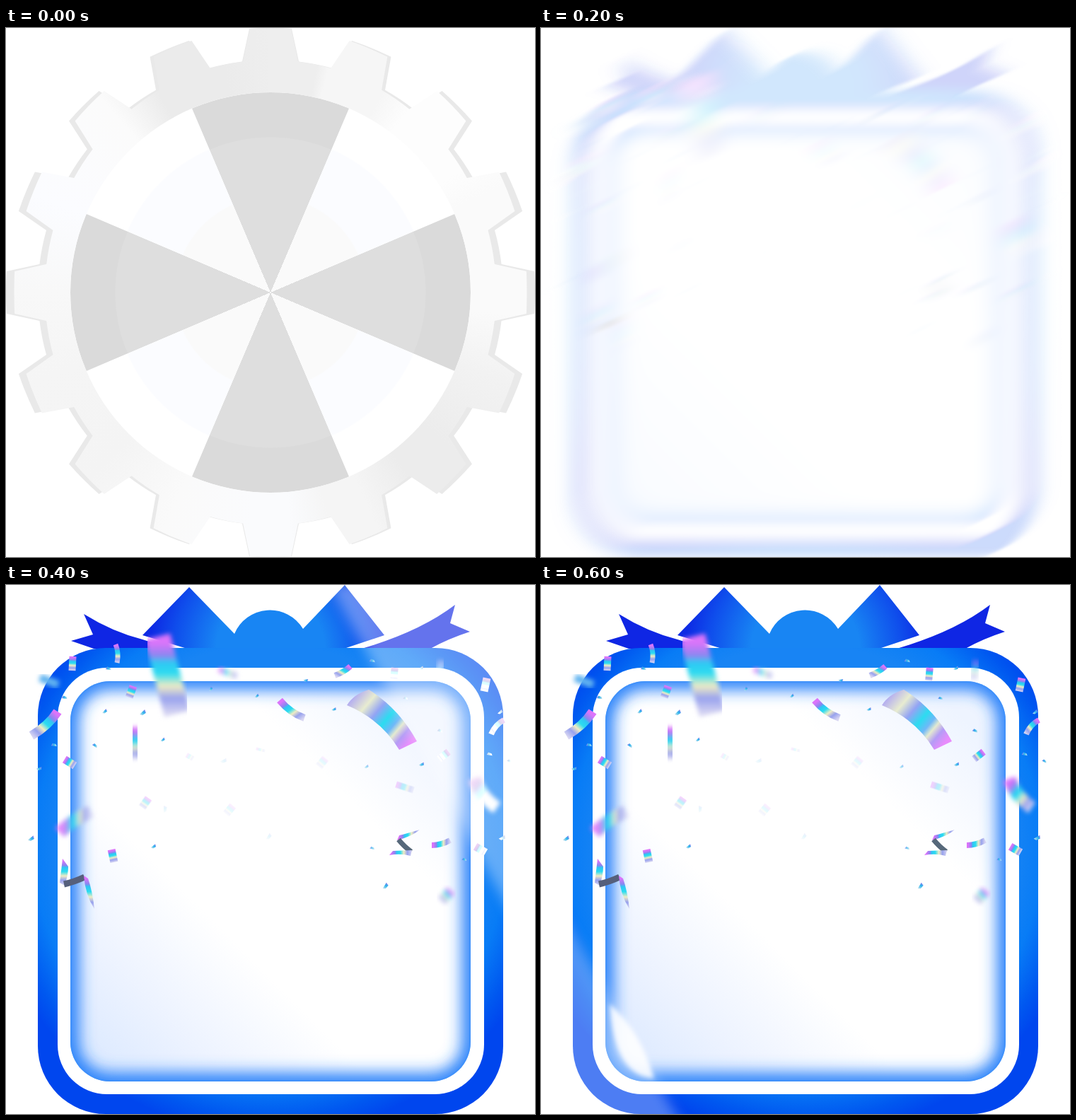
Write an HTML page without scripts that moves like this. It is 748x748 px and loops after 0.7 s.

```html
<!DOCTYPE html>
<html lang="en">
<head>
<meta charset="utf-8">
<title>Gear and gift box</title>
<style>
  html, body { margin: 0; width: 100%; height: 100%; overflow: hidden; background: #fff; }
  .stage { position: relative; width: 748px; height: 748px; overflow: hidden; }
  .stage > *, .rim, .face, .dark { position: absolute; inset: 0; }
  .step { animation: .7s step-end infinite; }

  .wheel { animation-name: wheel; }
  .rim { clip-path: url(#cog); background: #e9e9e9; }
  .rim.top {
    transform: scaleX(.97);
    background: conic-gradient(#eee 0 12deg, #f6f6f6 15deg 30deg, #fdfdfd 38deg 58deg,
      #fafafa 66deg 95deg, #f2f2f2 110deg, #ececec 130deg 142deg, #f5f5f5 155deg 165deg,
      #fafbfd 175deg 185deg, #fafafa 205deg, #f4f4f4 225deg, #f5f5f5 250deg,
      #f8f8f8 270deg, #fbfcff 292deg, #fbfbfb 318deg, #ebebeb 330deg 348deg, #eee);
  }
  .face, .dark { inset: 91px; border-radius: 50%; }
  .face { background: radial-gradient(circle, #fafafa 134px, #fbfcff 136px 219px, #fff 221px); }
  .dark { background: radial-gradient(circle, #dedede 219px, #dadada 220px); }
  .hard {
    animation-name: hard;
    mask: repeating-conic-gradient(#000 0 23deg, #0000 23.2deg 66.8deg, #000 67deg 90deg);
  }
  .shaded {
    animation-name: shaded;
    mask: repeating-conic-gradient(#000 0 10deg, #000c 14deg, #0006 22deg, #0002 28deg,
      #0000 34deg 56deg, #0002 62deg, #0006 68deg, #000c 76deg, #000 80deg 90deg);
  }
  .smear { animation-name: smear; }
  .gift { animation-name: gift; }
  .glint { animation-name: glint; }
  .shine-a { animation-name: shineA; }
  .shine-b { animation-name: shineB; }

  @keyframes wheel { 0% { opacity: 1 } 28.57%, 100% { opacity: 0 } }
  @keyframes hard { 0% { opacity: 1 } 14.28%, 100% { opacity: 0 } }
  @keyframes shaded { 0% { opacity: 0 } 14.28%, 100% { opacity: 1 } }
  @keyframes smear { 0% { opacity: 0 } 28.57% { opacity: .2 } 42.85%, 100% { opacity: 0 } }
  @keyframes gift { 0% { opacity: 0 } 42.85% { opacity: .2 } 57.14%, 100% { opacity: 1 } }
  @keyframes glint {
    0% { filter: none }
    57.14% { filter: grayscale(.75) brightness(1.4) }
    71.42%, 100% { filter: none }
  }
  @keyframes shineA {
    0% { opacity: 0 } 57.14% { opacity: .36 } 71.42% { opacity: .12 } 85.71%, 100% { opacity: 0 }
  }
  @keyframes shineB { 0% { opacity: 0 } 71.42% { opacity: .4 } 85.71%, 100% { opacity: 1 } }
</style>
</head>
<body>
<div class="stage">

  <div class="wheel step">
    <div class="rim"></div>
    <div class="rim top"></div>
    <svg width="748" height="748">
      <defs>
        <path id="tooth" d="M330 60L334 47L344 1Q374 -1 404 1L414 47L418 60Z"/>
        <clipPath id="cog">
          <circle cx="374" cy="374" r="329"/>
          <use href="#tooth"/>
          <use href="#tooth" transform="rotate(22.5 374 374)"/>
          <use href="#tooth" transform="rotate(45 374 374)"/>
          <use href="#tooth" transform="rotate(67.5 374 374)"/>
          <use href="#tooth" transform="rotate(90 374 374)"/>
          <use href="#tooth" transform="rotate(112.5 374 374)"/>
          <use href="#tooth" transform="rotate(135 374 374)"/>
          <use href="#tooth" transform="rotate(157.5 374 374)"/>
          <use href="#tooth" transform="rotate(180 374 374)"/>
          <use href="#tooth" transform="rotate(202.5 374 374)"/>
          <use href="#tooth" transform="rotate(225 374 374)"/>
          <use href="#tooth" transform="rotate(247.5 374 374)"/>
          <use href="#tooth" transform="rotate(270 374 374)"/>
          <use href="#tooth" transform="rotate(292.5 374 374)"/>
          <use href="#tooth" transform="rotate(315 374 374)"/>
          <use href="#tooth" transform="rotate(337.5 374 374)"/>
        </clipPath>
      </defs>
      <circle cx="374" cy="374" r="308" fill="#ebebeb"/>
      <circle cx="374" cy="374" r="299" fill="#efefef"/>
      <ellipse cx="375" cy="374" rx="289" ry="284" fill="#f8f8f8"/>
    </svg>
    <div class="face"></div>
    <div class="dark hard step"></div>
    <div class="dark shaded step"></div>
  </div>

  <svg width="748" height="748" viewBox="0 0 748 748">
    <defs>
      <radialGradient id="blue" gradientUnits="userSpaceOnUse" cx="374" cy="374" r="440">
        <stop offset=".66" stop-color="#1884f4"/>
        <stop offset=".76" stop-color="#087cf6"/>
        <stop offset=".86" stop-color="#0058f0"/>
        <stop offset=".92" stop-color="#0046ee"/>
      </radialGradient>
      <radialGradient id="bow" gradientUnits="userSpaceOnUse" cx="374" cy="90" r="170">
        <stop offset=".45" stop-color="#1885f3"/>
        <stop offset=".8" stop-color="#0f4eec"/>
        <stop offset="1" stop-color="#0d2ae4"/>
      </radialGradient>
      <linearGradient id="sheet" x1="0" y1="1" x2="1" y2="0">
        <stop offset="0" stop-color="#d6e6ff"/>
        <stop offset=".2" stop-color="#edf3ff"/>
        <stop offset=".38" stop-color="#fff"/>
        <stop offset=".7" stop-color="#fff"/>
        <stop offset=".9" stop-color="#eef4ff"/>
      </linearGradient>
      <linearGradient id="foil" x2="0" y2="1">
        <stop offset=".08" stop-color="#dc74fa"/>
        <stop offset=".25" stop-color="#8a86f0"/>
        <stop offset=".33" stop-color="#2fc6f4"/>
        <stop offset=".48" stop-color="#2cdcf0"/>
        <stop offset=".64" stop-color="#efecc4"/>
        <stop offset=".8" stop-color="#98a2ee"/>
        <stop offset="1" stop-color="#d8d6f2"/>
      </linearGradient>
      <linearGradient id="foilX" href="#foil" x1="0" y1="0" x2="1" y2="0"/>
      <linearGradient id="foilD" href="#foil" x1="0" y1="0" x2="1" y2="1"/>
      <linearGradient id="foilU" href="#foil" x1="1" y1="0" x2="0" y2="1"/>
      <linearGradient id="wide" gradientUnits="userSpaceOnUse" x1="490" y1="160" x2="572" y2="230">
        <stop offset="0" stop-color="#b4aef0"/>
        <stop offset=".2" stop-color="#e8ecd0"/>
        <stop offset=".36" stop-color="#93a4f4"/>
        <stop offset=".52" stop-color="#2cdcf0"/>
        <stop offset=".64" stop-color="#6fb8f8"/>
        <stop offset=".72" stop-color="#e4ead0"/>
        <stop offset=".82" stop-color="#b49cf6"/>
        <stop offset=".95" stop-color="#e88cfc"/>
      </linearGradient>
      <linearGradient id="tiny" x2="0" y2="1">
        <stop offset="0" stop-color="#9a7cf0"/>
        <stop offset=".4" stop-color="#28b4ec"/>
        <stop offset="1" stop-color="#cfe4ee"/>
      </linearGradient>
      <rect id="chip" x="-.5" y="-.5" width="1" height="1" fill="url(#foil)"/>
      <path id="bit" d="M-2 -5L2.5 -3L1.5 3L-2 5Z" fill="url(#tiny)"/>
      <filter id="soft" x="-50%" y="-50%" width="200%" height="200%"><feGaussianBlur stdDeviation="3"/></filter>
      <filter id="glow" filterUnits="userSpaceOnUse" x="30" y="70" width="690" height="690"><feGaussianBlur stdDeviation="11"/></filter>
      <filter id="haze" filterUnits="userSpaceOnUse" x="-60" y="-60" width="880" height="880"><feGaussianBlur stdDeviation="9"/></filter>
      <filter id="streak" filterUnits="userSpaceOnUse" x="-250" y="-250" width="1250" height="1250"><feGaussianBlur stdDeviation="15 1.5"/></filter>
      <clipPath id="pane"><rect x="91" y="136" width="566" height="566" rx="56"/></clipPath>
    </defs>

    <!-- directional blur: tilt, smear, tilt back -->
    <g class="smear step">
      <g transform="rotate(-26 374 374)"><g filter="url(#streak)">
        <use href="#art" transform="rotate(26 374 374)"/>
      </g></g>
    </g>

    <g class="gift step">
      <g id="art">
        <g fill="#0f26e4">
          <path d="M110 41Q150 66 193 77L234 90H124L92 79L123 70Z"/>
          <path d="M635 28L628 54L656 66Q625 76 600 90H503Q585 66 635 28Z"/>
        </g>
        <path fill="url(#bow)" d="M193 71L259 3L323 69A54.5 54.5 0 0 1 420 62L479 0L535 71L478 90H256Z"/>
        <rect x="45" y="89" width="658" height="659" rx="96" fill="url(#blue)"/>
        <rect x="73" y="117" width="603" height="603" rx="70" fill="#fff"/>
        <g clip-path="url(#pane)">
          <rect x="91" y="136" width="566" height="566" fill="url(#sheet)"/>
          <rect x="87" y="132" width="574" height="574" rx="60" fill="none" stroke="#2680fa" stroke-width="32" filter="url(#glow)"/>
          <rect x="91" y="136" width="566" height="566" rx="56" fill="none" stroke="#3d90fa" stroke-width="4" opacity=".6"/>
        </g>

        <g fill="none">
          <g filter="url(#soft)">
            <path d="M214 73L242 182" stroke="url(#foil)" stroke-width="37"/>
          </g>
          <path d="M482 170Q492 154 513 148Q556 175 581 221L556 233Q530 190 482 170Z" fill="url(#wide)"/>
          <path d="M73 179Q60 199 36 213" stroke="url(#foilU)" stroke-width="13"/>
          <path d="M155 84Q160 96 157 110" stroke="url(#foil)" stroke-width="7"/>
          <path d="M387 163Q402 181 422 188" stroke="url(#foilD)" stroke-width="10"/>
          <path d="M487 115Q478 123 465 128" stroke="url(#foilU)" stroke-width="8"/>
          <path d="M602 368Q615 368 628 361" stroke="url(#foilX)" stroke-width="8"/>
          <g filter="url(#soft)"><path d="M181 201L184 246" stroke="url(#foil)" stroke-width="15"/></g>
          <g filter="url(#soft)"><path d="M48 131L74 141" stroke="#62b4f0" stroke-width="11"/></g>
          <g filter="url(#soft)" opacity=".7"><path d="M301 119L327 129" stroke="url(#foilX)" stroke-width="9"/></g>
          <g filter="url(#soft)" opacity=".85"><path d="M76 350Q92 334 120 320" stroke="url(#foilX)" stroke-width="18"/></g>
          <g filter="url(#soft)" opacity=".8"><path d="M629 432L616 447" stroke="url(#foilU)" stroke-width="14"/></g>

          <path d="M80 387L88 398Q88 410 83 425L76 421Q78 404 80 387Z" fill="url(#foil)"/>
          <path d="M82 423Q96 420 111 413" stroke="#56607c" stroke-width="9"/>
          <path d="M110 411L116 415Q122 432 125 458Q112 438 110 411Z" fill="url(#foil)"/>
          <path d="M585 346Q575 355 553 361L556 354Q568 351 585 346Z" fill="url(#foilX)"/>
          <path d="M555 360Q563 370 573 377" stroke="#56687a" stroke-width="7"/>
          <path d="M574 375L572 383Q558 379 542 382L547 376Z" fill="url(#foilX)"/>
        </g>

        <use href="#chip" transform="translate(94 111) rotate(3) scale(10 20)"/>
        <use href="#chip" transform="translate(177 151) rotate(20) scale(11 17)"/>
        <use href="#chip" transform="translate(90 251) rotate(-58) scale(11 17)"/>
        <use href="#chip" transform="translate(151 383) rotate(-12) scale(11 18)"/>
        <g opacity=".3">
          <use href="#chip" transform="translate(564 286) rotate(-72) scale(9 26)"/>
          <use href="#chip" transform="translate(197 308) rotate(35) scale(11 16)"/>
        </g>
        <g opacity=".12">
          <use href="#chip" transform="translate(447 251) rotate(40) scale(11 15)"/>
          <use href="#chip" transform="translate(316 318) rotate(40) scale(11 15)"/>
          <use href="#chip" transform="translate(360 233) rotate(-75) scale(4 13)"/>
          <use href="#chip" transform="translate(260 243) rotate(-60) scale(7 11)"/>
          <use href="#bit" transform="translate(225 317)"/>
          <use href="#bit" transform="translate(308 249) rotate(60)"/>
          <use href="#bit" transform="translate(372 356) rotate(30)"/>
        </g>

        <use href="#bit" transform="translate(83 159) rotate(-80) scale(.8)"/>
        <use href="#bit" transform="translate(140 179) rotate(40) scale(.8)"/>
        <use href="#bit" transform="translate(194 181) rotate(45)"/>
        <use href="#bit" transform="translate(126 227) rotate(-55) scale(.8)"/>
        <use href="#bit" transform="translate(68 226) rotate(-85) scale(.8)"/>
        <use href="#bit" transform="translate(47 260) rotate(70) scale(.8)"/>
        <use href="#bit" transform="translate(222 219) rotate(45) scale(.7)"/>
        <use href="#bit" transform="translate(209 370) rotate(50) scale(.8)"/>
        <use href="#bit" transform="translate(36 359) rotate(50)"/>
        <use href="#bit" transform="translate(145 118) rotate(-80) scale(.8)"/>
        <use href="#bit" transform="translate(290 147) rotate(20) scale(.7)"/>
        <use href="#bit" transform="translate(355 157) rotate(40) scale(.7)"/>
        <use href="#bit" transform="translate(424 135) rotate(80) scale(.7)"/>
        <use href="#bit" transform="translate(464 176) rotate(60) scale(.7)"/>
        <use href="#bit" transform="translate(518 107) rotate(-80) scale(.8)"/>
        <use href="#bit" transform="translate(510 257) rotate(50) scale(.7)" opacity=".5"/>
        <use href="#bit" transform="translate(518 372) rotate(-75) scale(.7)" opacity=".7"/>
        <use href="#bit" transform="translate(588 254) rotate(60) scale(.8)"/>
        <use href="#bit" transform="translate(648 388) rotate(-80) scale(.7)"/>
        <use href="#bit" transform="translate(537 426) rotate(30)"/>

        <g class="glint step">
          <use href="#chip" transform="translate(549 126) rotate(5) scale(10 18)"/>
          <use href="#chip" transform="translate(678 141) rotate(12) scale(11 19)"/>
          <use href="#chip" transform="translate(619 241) rotate(52) scale(10 17)"/>
          <use href="#chip" transform="translate(671 374) rotate(-60) scale(11 17)"/>
          <g fill="none">
            <path d="M704 191Q692 197 686 211" stroke="url(#foilU)" stroke-width="8"/>
            <g filter="url(#soft)"><path d="M662 274Q672 300 694 315" stroke="url(#foilD)" stroke-width="18"/></g>
            <g filter="url(#soft)" opacity=".5"><path d="M616 107L611 134" stroke="url(#foil)" stroke-width="11"/></g>
          </g>
          <use href="#bit" transform="translate(587 118) rotate(55) scale(.8)"/>
          <use href="#bit" transform="translate(565 160) rotate(-80) scale(.7)"/>
          <use href="#bit" transform="translate(614 206) rotate(-70) scale(.8)"/>
          <use href="#bit" transform="translate(684 239) rotate(-80) scale(.8)"/>
          <use href="#bit" transform="translate(699 180) rotate(45) scale(.8)"/>
          <use href="#bit" transform="translate(712 249) rotate(-60) scale(.7)"/>
          <use href="#bit" transform="translate(702 358) rotate(60)"/>
        </g>
      </g>

      <g class="shine-a step" fill="#fff">
        <path filter="url(#haze)" d="M458 0L800 -40V620Z"/>
      </g>
      <g class="shine-b step" fill="#fff">
        <path filter="url(#haze)" opacity=".3" d="M20 446L200 766H-20V446Z"/>
        <path filter="url(#soft)" opacity=".85" d="M97 592Q140 630 160 698Q104 694 97 592Z"/>
      </g>
    </g>
  </svg>
</div>
</body>
</html>
```
